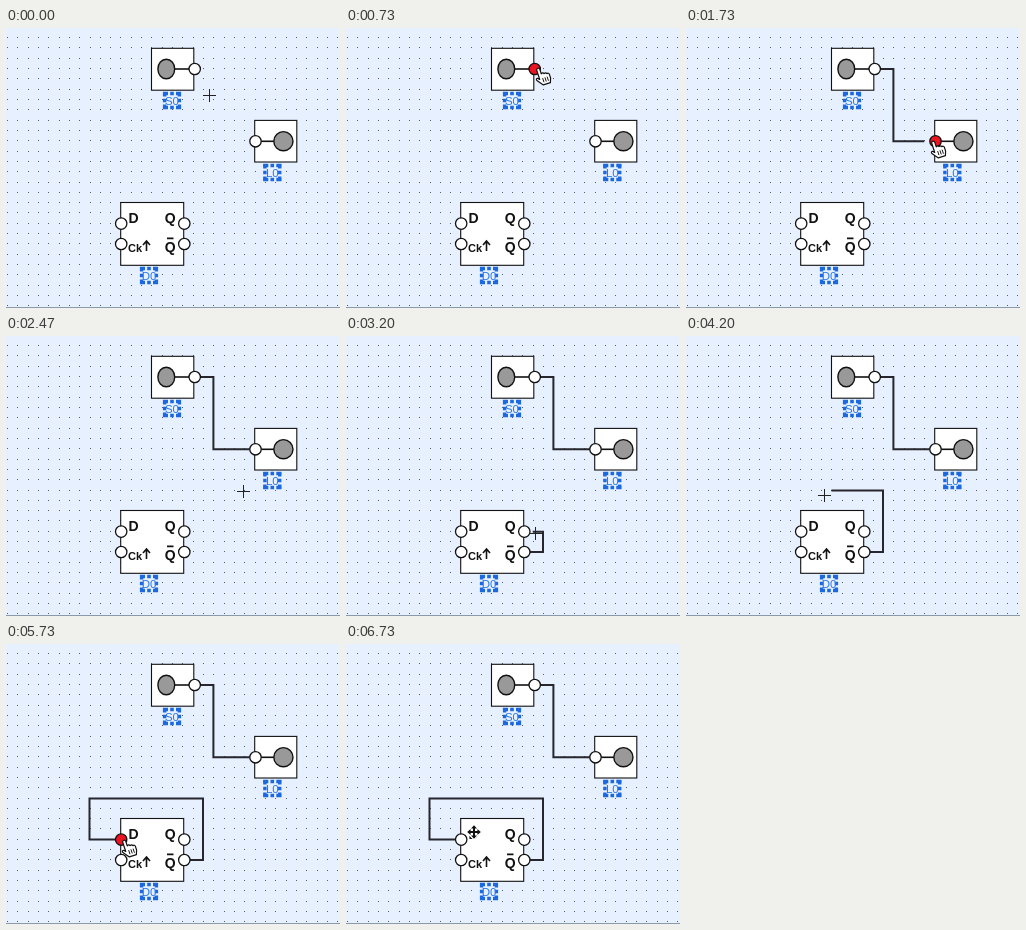
Recreate the animation shown at these times as an HTML page. Size 334x280 px, loop 6790 ms.

```html
<!DOCTYPE html>
<html lang="en">
<head>
<meta charset="utf-8">
<title>Wiring a circuit</title>
<style>
html, body { margin: 0; width: 100%; height: 100%; overflow: hidden; background: #e6f0ff; }
svg { display: block; width: 334px; height: 280px; }
text { font-family: "Liberation Sans", Arial, sans-serif; }
.box { fill: #fff; stroke: #111; stroke-width: 1.1; }
.lead { fill: none; stroke: #111; stroke-width: 1.6; }
.lamp { fill: #999; stroke: #111; stroke-width: 1.4; }
.pin { fill: #fff; stroke: #111; stroke-width: 1.3; }
.pin.hot { fill: #ee1320; }
.wire { fill: none; stroke: #26262c; stroke-width: 2; }
.tag { fill: none; stroke: #1c68e0; stroke-width: 3.4; }
.tagText { fill: #2a78e4; font-size: 11.5px; text-anchor: middle; }
.gate { font-weight: bold; fill: #111; }
</style>
</head>
<body>
<svg viewBox="0 0 334 280">
  <path id="dots" fill="#4f5d73"/>
  <path d="M0 279.5H334" stroke="#8c9aae"/>
  <g id="tags"></g>
  <rect class="box" x="145.5" y="20.3" width="42.3" height="41.9"/>
  <path class="lead" d="M168 41H184"/>
  <ellipse class="lamp" cx="160.3" cy="41" rx="8.4" ry="9.8"/>
  <rect class="box" x="248.7" y="92.4" width="42.1" height="41.6"/>
  <path class="lead" d="M254 113.3H268"/>
  <circle class="lamp" cx="277.4" cy="113.2" r="9.6"/>
  <rect class="box" x="114.7" y="174.5" width="63" height="62.8"/>
  <g class="gate">
    <text x="122.5" y="195" font-size="14">D</text>
    <text x="158.8" y="195" font-size="14">Q</text>
    <text x="122" y="224" font-size="11">Ck</text>
    <text x="158.8" y="224" font-size="14">Q</text>
  </g>
  <path class="lead" d="M161 210.4H167.5M140.5 223V213M137 217L140.5 213L144 217"/>
  <path class="wire" id="w0"/>
  <path class="wire" id="w1"/>
  <g id="pins"></g>
  <g id="cross"><path d="M-6 -0.5H7M0.5 -7V6" stroke="#222"/></g>
  <g id="move">
    <path d="M0 -7L7 0L0 7L-7 0Z" fill="#fff" stroke="#fff" stroke-width="2"/>
    <path d="M-5 0H5M0 -5V5" stroke="#111" stroke-width="2"/>
    <path d="M0 -6.8L3 -3.4H-3ZM0 6.8L3 3.4H-3ZM-6.8 0L-3.4 -3V3ZM6.8 0L3.4 -3V3Z" fill="#111"/>
  </g>
  <g id="hand">
    <g transform="rotate(-18)" stroke="#111" stroke-linejoin="round" stroke-linecap="round">
      <path d="M-1.6 10.5V0.8Q-1.4 -0.8 0 -0.8Q1.5 -0.8 1.6 0.8V5.6Q3.8 4.4 4.4 6.3Q6.4 5.3 7 7.2Q9 6.6 9.2 8.6V12.4L7.6 16.8H0.2L-4.6 10.6Q-5.2 8.6 -3.4 8.6Z" fill="#fff" stroke-width="1.2"/>
      <path d="M1.6 10.5V14M4 10.5V14M6.3 10.5V14" stroke-width="0.9"/>
    </g>
  </g>
</svg>
<script>
const LOOP = 6790, STEP = 1000 / 15, LAG = 40;
const PITCH = 10.32, OX = 83.5, OY = 41;
const $ = id => document.getElementById(id);

// Cursor stops: time, x, y; eased in between
const stops = [
  [0, 203, 68], [400, 200, 15], [670, 192, 41],
  [870, 192, 41], [1660, 232, 110], [1730, 247, 114],
  [1930, 247, 114], [2130, 273, 119], [2930, 179, 217],
  [3030, 179, 217], [3200, 189, 198], [3800, 189, 160],
  [4670, 72, 160], [5000, 94, 168], [5470, 118, 197],
  [5730, 118, 197], [6130, 129, 193], [6500, 129, 193], [6530, 128, 188]
];
const pins = [[188.7, 41], [249.5, 113.3], [115.2, 195.6], [115.2, 216], [178.3, 195.6], [178.3, 216]];
const boxes = [[146, 20, 188, 62], [249, 92, 291, 134], [115, 175, 178, 237]];
const tags = [["S0", 166, 72.5], ["L0", 266.3, 144.5], ["D0", 143, 247.5]];

let d = "";
for (let y = OY - 4 * PITCH; y < 280; y += PITCH)
  for (let x = OX - 8 * PITCH; x < 334; x += PITCH)
    d += `M${Math.round(x)} ${Math.round(y) - 1}h1v1h-1z`;
$("dots").setAttribute("d", d);

$("tags").innerHTML = tags.map(([name, x, y]) =>
  `<rect x="${x - 7}" y="${y - 7}" width="14" height="14" fill="#e6f0ff"/>
   <path class="tag" stroke-dasharray="5 2.2 3.6 2.2 5 0" d="M${x - 9} ${y - 7}h18M${x - 9} ${y + 7}h18"/>
   <path class="tag" stroke-dasharray="4.5 2.2 3.6 2.2 4.5 0" d="M${x - 7.4} ${y - 8.5}v17M${x + 7.4} ${y - 8.5}v17"/>
   <text class="tagText" x="${x}" y="${y + 4.2}">${name}</text>`).join("");
$("pins").innerHTML = pins.map(([x, y]) => `<circle class="pin" cx="${x}" cy="${y}" r="5.7"/>`).join("");
const pinMarks = [...$("pins").children];

function cursorAt(t) {
  const next = stops.findIndex(s => s[0] > t);
  if (next < 0) return stops[stops.length - 1].slice(1);
  if (next === 0) return stops[0].slice(1);
  const [t0, x0, y0] = stops[next - 1], [t1, x1, y1] = stops[next];
  const u = (t - t0) / (t1 - t0), k = u * u * (3 - 2 * u);
  return [x0 + (x1 - x0) * k, y0 + (y1 - y0) * k];
}

const snap = (v, o) => o + Math.round((v - o) / PITCH) * PITCH;

// The loose end trails the cursor on the grid
function looseEnd(t) {
  const [x, y] = cursorAt(t - LAG);
  return [snap(x, OX), snap(y - 1, OY)];
}

function topWire(t) {
  if (t < 990) return [];
  const [x, y] = t < 1860 ? looseEnd(t) : pins[1];
  const bend = Math.min(x, 207.4);
  return [pins[0], [bend, 41], [bend, y], [x, y]];
}

function loopWire(t) {
  if (t < 3130) return [];
  const [x, y] = t < 5460 ? looseEnd(t) : pins[2];
  const start = [pins[5], [197, 216]];
  if (t < 4660) return [...start, [197, y], [x, y]];
  return [...start, [197, 154.5], [83.5, 154.5], [83.5, y], [x, y]];
}

function drawWire(id, pts) {
  $(id).setAttribute("d", pts.length ? "M" + pts.map(p => p.join(" ")).join("L") : "");
}

function draw(now) {
  const t = Math.floor((now % LOOP + 4) / STEP) * STEP;
  const [x, y] = cursorAt(t);
  const hot = pins.findIndex(([px, py]) => Math.hypot(px - x, py - y) < 7);
  const inside = boxes.some(([l, u, r, b]) => x > l && x < r && y > u && y < b);
  const shape = hot >= 0 ? "hand" : inside ? "move" : "cross";
  for (const id of ["cross", "move", "hand"]) {
    $(id).setAttribute("transform", `translate(${Math.round(x)} ${Math.round(y)})`);
    $(id).setAttribute("visibility", id === shape ? "visible" : "hidden");
  }
  pinMarks.forEach((p, i) => p.classList.toggle("hot", i === hot));
  drawWire("w0", topWire(t));
  drawWire("w1", loopWire(t));
}

const begin = performance.now();
function tick() {
  draw(performance.now() - begin);
  requestAnimationFrame(tick);
}
draw(0);
requestAnimationFrame(tick);
</script>
</body>
</html>
```
